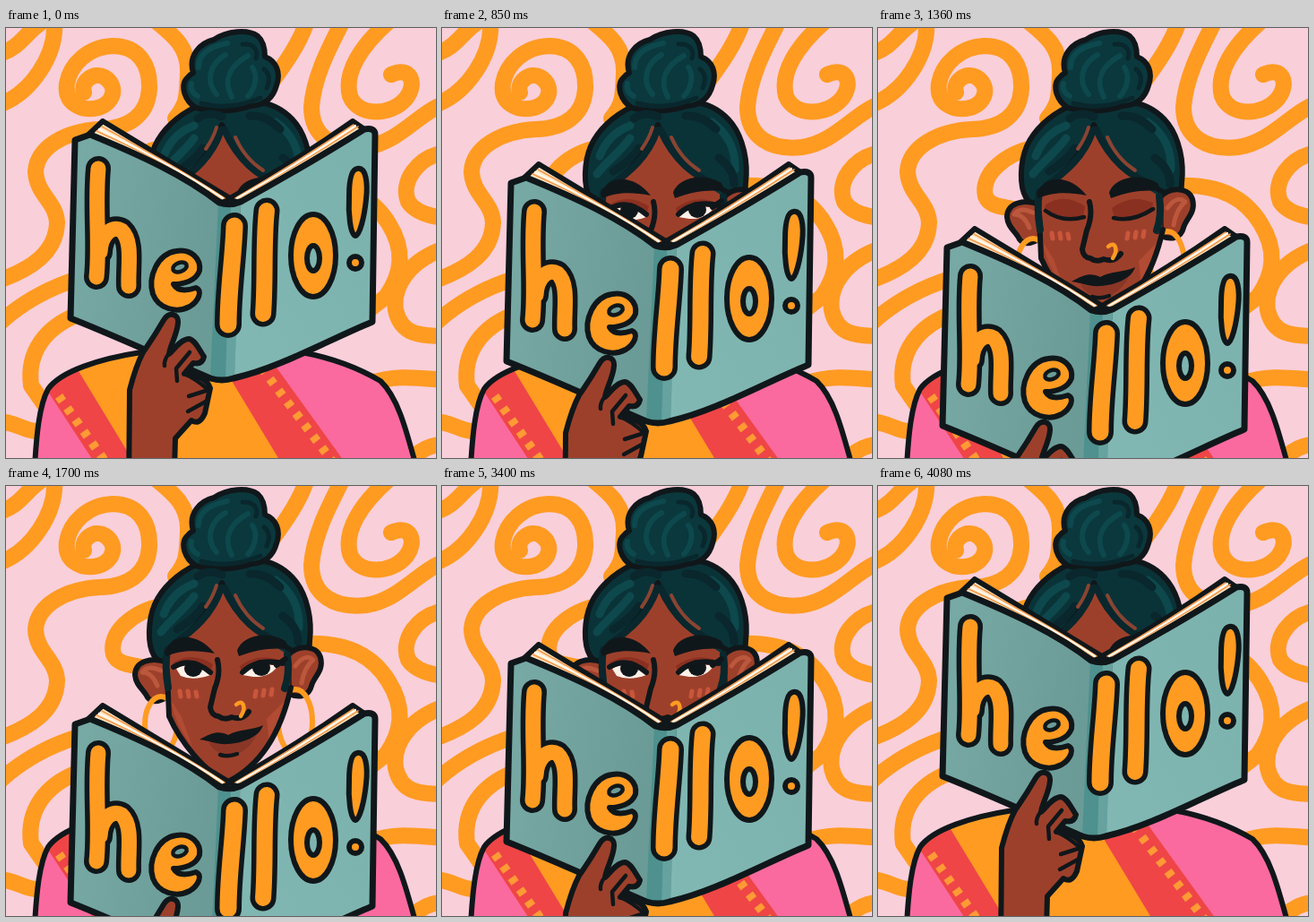
Recreate the animation shown at these times as an HTML page. Size 480 px wide and 480 px high, loop 4.42 s.

```html
<!DOCTYPE html>
<html lang="en">
<head>
<meta charset="utf-8">
<title>Hello</title>
<style>
  html, body { margin: 0; width: 100%; height: 100%; overflow: hidden; background: #f9cfda; }
  svg { display: block; width: 100vw; height: 100vh; }
  path, ellipse, circle { stroke-linecap: round; stroke-linejoin: round; }
  .line { fill: none; stroke: #10171a; stroke-width: 6; }
  .ink { fill: #10171a; }
  .edge { stroke: #10171a; stroke-width: 6; }
  .swirl { fill: none; stroke: #ff9b21; stroke-width: 18; }
  .skin { fill: #9d402b; }
  .strand { fill: none; stroke: #0d484d; }
  .deep { fill: none; stroke: #09272c; }
  .gold { fill: #ff9b21; }
  .hoop { fill: none; stroke: #ff9b21; stroke-width: 6; }
  .blush { fill: none; stroke: #c9563c; stroke-width: 5; }
  .dash { fill: none; stroke: #ff9a35; stroke-width: 10; stroke-dasharray: 7 9; stroke-linecap: butt; }
  .shade { fill: #8a3021; }
  .white { fill: #fff0e8; }
  .thin { stroke-width: 4.5; }
  .bold { stroke-width: 7; }
</style>
</head>
<body>
<svg viewBox="0 0 480 480">
  <defs>
    <linearGradient id="leftCover" x1="0" y1="0" x2="1" y2=".25">
      <stop offset="0" stop-color="#78aaa6"/>
      <stop offset="1" stop-color="#6b9b97"/>
    </linearGradient>
    <linearGradient id="rightCover" x1="0" y1="1" x2="1" y2="0">
      <stop offset="0" stop-color="#82b8b3"/>
      <stop offset="1" stop-color="#7bb1ac"/>
    </linearGradient>
    <path id="shirtShape" d="M32 490C34 455 37 421 47 403C61 383 105 369 151 362L330 362C362 368 391 378 418 394C438 413 447 450 458 490Z"/>
    <clipPath id="shirtClip"><use href="#shirtShape"/></clipPath>
  </defs>

  <rect width="480" height="480" fill="#f9cfda"/>
  <g id="swirls"></g>

  <!-- shirt -->
  <g clip-path="url(#shirtClip)">
    <rect y="350" width="480" height="130" fill="#ff9b21"/>
    <path d="M20 380L48 400L110 490H20Z" fill="#fb6a9e"/>
    <path d="M43 400L78 378L146 490H102Z" fill="#ef4547"/>
    <path d="M290 370L330 355H470V490H378Z" fill="#fb6a9e"/>
    <path d="M246 384L294 368L382 490H310Z" fill="#ef4547"/>
    <path class="dash" d="M59 411L113 487M285 379L366 486"/>
  </g>
  <use href="#shirtShape" fill="none" class="edge"/>

  <!-- head -->
  <path class="edge" fill="#0a3338" d="M212 88C191 98 174 114 166 132C158 151 158 177 165 189C174 202 183 207 189 211L314 211C330 203 339 190 339 173C342 149 336 123 324 107C314 94 300 86 288 84Z"/>
  <path class="edge" fill="#0a383d" d="M212 89C199 81 195 65 201 57Q205 52 209 50C203 31 216 17 232 13C247 3 270 1 281 9C288 15 289 24 289 32C302 37 307 50 302 64C298 79 288 86 274 87C254 94 229 94 212 89Z"/>
  <g class="strand" stroke-width="6">
    <path d="M215 44C215 27 231 20 247 17M235 74C222 59 228 39 245 30M252 77C242 58 250 42 270 31M270 76C279 67 281 52 275 44M214 76Q205 71 207 62"/>
    <path d="M176 143C183 125 194 115 210 109M173 163C184 149 198 139 210 123M301 105C321 119 328 139 327 158" stroke-width="9"/>
  </g>
  <g class="deep" stroke-width="5">
    <path d="M264 18C277 17 282 25 279 34M288 46Q297 53 291 67M218 84Q248 93 284 78"/>
    <path d="M214 101Q226 92 241 99M272 98Q291 97 306 113M309 145Q326 157 326 174M191 160Q211 148 220 134" stroke-width="9"/>
  </g>

  <path class="skin edge" d="M180 197C162 190 144 196 144 211C145 223 154 227 158 236Q165 245 181 235Z"/>
  <path class="skin edge" d="M315 189C325 177 346 177 351 191C355 207 344 212 341 223C338 235 327 237 316 232Z"/>
  <path d="M173 206Q158 199 152 208Q163 208 169 223M323 201Q334 186 343 194Q333 202 330 220" fill="none" stroke="#bb573c" stroke-width="5"/>
  <ellipse class="hoop" cx="173" cy="266" rx="18" ry="31"/>
  <ellipse class="hoop" cx="323" cy="263" rx="19" ry="36"/>

  <path class="skin" d="M240 108C231 136 205 163 180 184L181 258C196 288 220 321 248 330C282 313 306 279 317 230L318 190C289 174 261 150 240 108Z"/>
  <path d="M184 239Q188 265 208 291L196 258ZM312 239L291 260L294 288Q309 267 312 239Z" fill="#b14b33"/>
  <path class="line" d="M180 207L182 257C194 284 222 321 248 330C282 313 306 279 318 225"/>
  <path class="line" d="M241 108C232 137 211 160 181 182M241 108C258 148 283 164 318 183"/>
  <path class="deep" d="M240 114C230 144 209 161 188 176M244 114C259 148 280 164 310 178" stroke-width="8"/>
  <path d="M235 111Q231 124 223 135M256 122C263 138 273 150 287 159" fill="none" stroke="#8a4432" stroke-width="4"/>
  <path class="deep" d="M180 183Q177 202 181 225M314 188Q317 210 311 226" stroke-width="8"/>

  <path class="ink" d="M177 185C186 163 214 163 233 187C214 184 199 182 179 190ZM258 184C263 168 290 160 312 173L316 182C295 180 277 183 260 190Z"/>
  <path class="shade" d="M187 197Q208 184 231 199L229 205Q208 192 187 202ZM261 201Q282 185 307 195L305 202Q281 192 263 208Z"/>

  <g id="open">
    <path class="white" d="M190 204Q207 194 228 211Q209 218 195 212ZM264 211Q279 195 303 201Q295 214 276 213Z"/>
    <ellipse class="ink" cx="209" cy="204" rx="10" ry="9"/>
    <ellipse class="ink" cx="285" cy="203" rx="10" ry="9"/>
    <path class="line" d="M187 202Q207 190 228 208M264 208Q280 192 309 198M302 200L312 193"/>
  </g>
  <g id="half">
    <path class="shade" d="M186 199Q207 182 231 200L228 210Q207 207 188 205ZM262 204Q281 183 307 196L304 205Q287 207 264 211Z"/>
    <path class="white" d="M191 205Q208 215 229 210Q211 219 197 213ZM264 211Q286 214 302 204Q292 215 273 214Z"/>
    <path class="line thin" d="M187 203Q206 212 230 208M263 209Q284 212 307 200"/>
  </g>
  <g id="shut">
    <path class="shade" d="M186 199Q207 182 231 200L228 213Q207 218 188 205ZM262 204Q281 183 307 196L304 206Q287 217 264 212Z"/>
    <path class="line thin" d="M187 204Q206 218 230 211M263 212Q284 217 307 202"/>
  </g>

  <path class="blush" d="M194 229l1 6M203 229l1 6M212 230l1 5M279 229l-1 6M288 228l-1 6M297 227l-1 6" stroke-linecap="butt"/>
  <path class="line" d="M236 194Q240 209 233 226L228 247Q229 256 237 257Q244 262 252 258Q264 262 271 252"/>
  <path class="hoop thin" d="M257 244C264 237 269 247 262 257"/>
  <path d="M226 286Q250 291 280 278Q269 298 253 300Q234 301 226 286Z" fill="#8a3627"/>
  <path class="ink" d="M216 283C230 275 238 273 248 278C260 271 274 273 287 267C283 280 265 287 248 288C236 289 226 284 216 283Z"/>
  <path class="line thin" d="M239 300Q248 303 258 299"/>

  <!-- book and hand -->
  <g id="book">
    <path class="edge" fill="#ffe5c4" d="M92 119L108 104L250 190L241 195C200 168 148 139 92 119Z"/>
    <path class="edge" fill="#ffe5c4" d="M400 113L387 104C342 136 300 162 250 190L262 194C307 169 357 140 400 113Z"/>
    <path d="M101 115C150 137 200 163 240 190M107 110C155 136 205 164 244 190M393 110C347 140 305 165 260 190M388 108C342 138 302 163 256 190" fill="none" stroke="#f39a4c" stroke-width="1.6"/>
    <path d="M104 113C153 137 203 164 242 190M390 109C345 139 304 164 258 190" fill="none" stroke="#fff8ec" stroke-width="2.2"/>

    <path fill="url(#leftCover)" d="M77 125L94 119C150 142 200 165 238 195L229 391L72 324Z"/>
    <path fill="url(#rightCover)" d="M262 194C307 169 357 140 400 113L412 118L409 328C356 350 306 379 252 391Z"/>
    <path fill="#4e918e" d="M237 195Q250 199 262 194L255 391Q241 395 228 391Z"/>
    <path fill="#7ab1ad" d="M251 198L262 194L255 391L245 393Z" opacity=".55"/>
    <path class="line bold" d="M77 125L94 119C150 142 200 165 238 195Q250 199 262 194C307 169 357 140 400 113Q412 111 412 119L409 328C356 350 306 379 254 391Q241 395 228 391C177 369 125 345 72 324Z"/>

    <g id="letters"></g>
    <path class="gold edge" d="M190 249C207 246 218 258 216 271C212 282 199 286 187 286C192 295 203 293 212 290C220 293 215 305 205 311C190 319 170 313 164 297C158 278 169 252 190 249Z"/>
    <ellipse class="edge thin" cx="194" cy="267" rx="8" ry="5" fill="#6b9b97" transform="rotate(-20 194 267)"/>
    <ellipse class="gold edge" cx="343" cy="254" rx="25" ry="46"/>
    <ellipse class="edge" cx="343" cy="257" rx="7" ry="14" fill="#7fb5b0"/>
    <path class="gold edge" d="M392 157C402 155 404 173 402 191C400 211 395 231 390 232C384 230 382 206 383 188C383 172 385 158 392 157Z"/>
    <circle class="gold edge" cx="390" cy="262" r="7"/>

    <path class="skin edge" d="M136 640L138 404Q145 377 153 362Q165 345 176 326C182 316 193 319 192 329C191 343 183 354 182 364C188 359 194 348 204 347C211 348 215 358 221 367Q219 376 209 374L199 386C212 387 225 392 228 402L222 430Q216 444 207 438L189 458L184 640Z"/>
    <path class="line thin" d="M182 363Q176 371 177 377M205 362L190 380L191 394M201 387Q211 391 226 404L204 411M223 417L203 428"/>
  </g>
</svg>

<script>
const $ = id => document.getElementById(id);

function addPath(parent, d, attrs = {}) {
  const path = document.createElementNS("http://www.w3.org/2000/svg", "path");
  path.setAttribute("d", d);
  for (const [key, value] of Object.entries(attrs)) path.setAttribute(key, value);
  parent.append(path);
}

[
  "M-8 29C16 23 23 3 42-8",
  "M54-8C57 30 28 73-8 86",
  "M87 72C83 60 98 48 110 55C126 65 120 84 103 89C83 94 65 83 68 62C72 40 92 21 119 20C148 20 161 41 160 68C158 99 135 112 105 113C66 115 35 133 33 160C34 186 56 194 57 217C56 251 28 269-8 282",
  "M80 280C45 291 15 309-8 330",
  "M80 320C44 334 23 362 28 399L44 422",
  "M-8 440C10 438 22 453 48 451",
  "M167-8C188 9 204 22 203 50S202 85 189 101",
  "M176 133C141 140 114 164 120 188C126 203 148 198 168 207",
  "M336-8C328 18 310 42 284 78",
  "M376-8C362 20 344 52 341 88C341 122 367 137 402 133C440 127 460 95 490 84",
  "M430 52C452 42 459 62 447 78C430 99 393 99 384 76C377 50 396 20 428-8",
  "M490 139C459 144 440 172 449 194Q459 209 490 212",
  "M335 176C384 174 411 192 427 218C446 248 442 275 424 300L406 314",
  "M490 246C449 260 431 289 435 315C441 342 461 344 490 344",
  "M406 397C431 387 456 390 490 393",
  "M490 465Q473 464 457 477"
].forEach(d => addPath($("swirls"), d, { class: "swirl" }));

// Straight letters: inner width and the strokes that form each one.
const letters = [
  [17, "M103 157C99 200 105 240 101 278M105 250C106 230 119 220 129 226C142 238 136 266 137 288"],
  [19, "M255 221C254 255 248 292 248 331"],
  [18, "M291 204C287 240 290 281 287 319"]
];
for (const [width, d] of letters) {
  addPath($("letters"), d, { fill: "none", stroke: "#10171a", "stroke-width": width + 11 });
  addPath($("letters"), d, { fill: "none", stroke: "#ff9b21", "stroke-width": width });
}

const duration = 4420;
const steps = [
  // start, book drop, eyes
  [0, 0, "open"], [510, 16, "open"], [680, 24, "open"], [850, 48, "open"],
  [1020, 73, "open"], [1190, 97, "half"], [1360, 120, "shut"], [1530, 134, "half"],
  [1700, 141, "open"], [2890, 134, "half"], [3060, 120, "shut"], [3230, 97, "half"],
  [3400, 73, "open"], [3570, 48, "open"], [3740, 24, "open"], [3910, 16, "open"],
  [4080, 0, "open"], [duration, 0, "open"]
];

function play(id, style) {
  const frames = steps.map(([start, drop, eyes]) =>
    ({ offset: start / duration, easing: "step-end", ...style(drop, eyes) }));
  $(id).animate(frames, { duration, iterations: Infinity });
}

play("book", drop => ({ transform: `translateY(${drop}px)` }));
for (const state of ["open", "half", "shut"])
  play(state, (drop, eyes) => ({ opacity: eyes === state ? 1 : 0 }));
</script>
</body>
</html>
```
